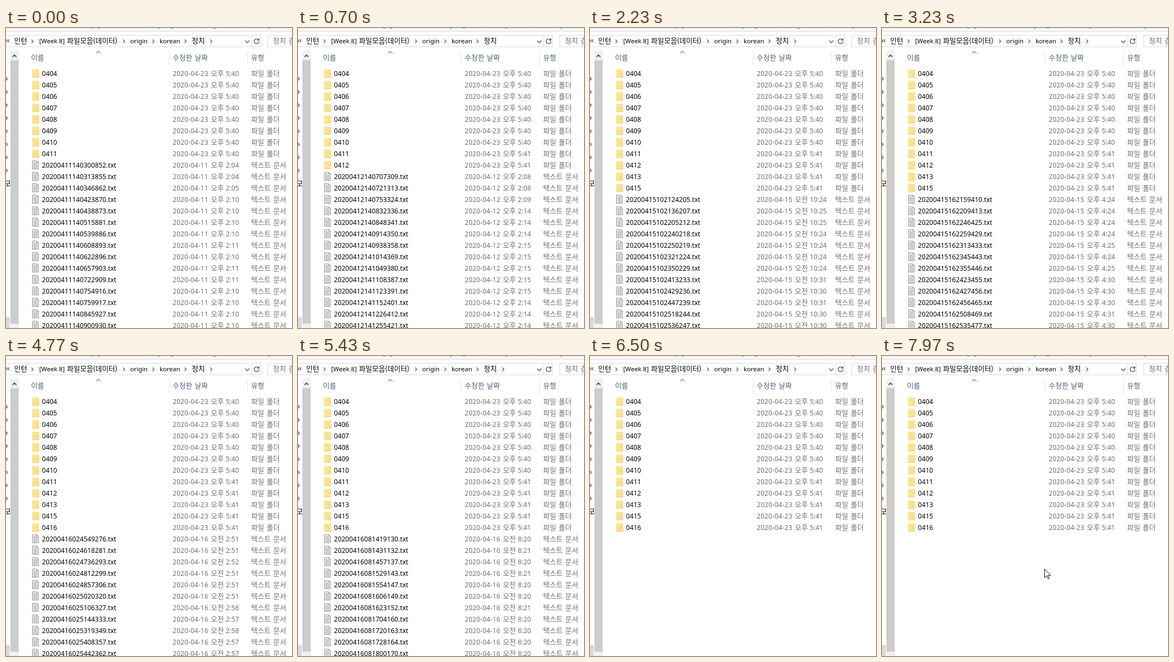
An HTML page for the animation above (8000 ms loop, 525 by 550 pixels).

```html
<!DOCTYPE html>
<html lang="ko">
<head>
<meta charset="utf-8">
<title>Folder list</title>
<style>
html, body { margin: 0; width: 100%; height: 100%; overflow: hidden; background: #fff; }
svg { display: block; width: 525px; height: 550px; }
text { white-space: pre; }
rect { shape-rendering: crispEdges; }
.num { font: 12.15px "Noto Sans", "Open Sans", sans-serif; }
.date { letter-spacing: .2px; }
.path { font: 11.5px "Noto Sans", "Open Sans", sans-serif; }
.kor { font: 13px "Noto Sans CJK KR", "Noto Sans CJK", sans-serif; word-spacing: 1px; }
</style>
</head>
<body>
<svg id="stage" viewBox="0 0 525 550" xmlns="http://www.w3.org/2000/svg">
  <defs>
    <g id="folder">
      <rect x="48" y="-7" width="12" height="15" fill="#f0cd62"/>
      <rect x="48" y="-7" width="11" height="14" fill="#ffe38a"/>
      <rect x="57" y="1" width="4" height="7" fill="#f0cd62"/>
      <rect x="58" y="2" width="2" height="5" fill="#fff0bd"/>
    </g>
    <g id="doc">
      <path d="M48.5 -7.5h8l3 3v12h-11z" fill="#fff" stroke="#8c8c8c"/>
      <path d="M56.5 -7.5v3h3" fill="none" stroke="#8c8c8c"/>
      <path d="M50 -4.5h5M50 -2.5h8M50 -.5h8M50 1.5h8M50 3.5h8M50 5.5h8" stroke="#9a9a9a" fill="none"/>
    </g>
  </defs>
</svg>
<script>
const LOOP = 8000, ROW = 21, TOP = 83, ROWS = 23;
const BLACK = '#000', GRAY = '#6d6d6d', HEAD = '#4c607a', EDGE = '#d9d9d9';
const stage = document.getElementById('stage');

function add(parent, tag, attrs, content) {
  const el = document.createElementNS('http://www.w3.org/2000/svg', tag);
  for (const key in attrs) el.setAttribute(key, attrs[key]);
  if (content) el.textContent = content;
  parent.appendChild(el);
  return el;
}
const rect = (x, y, width, height, fill) => add(stage, 'rect', { x, y, width, height, fill });
const line = (d, stroke, w) => add(stage, 'path', { d, stroke, 'stroke-width': w, fill: 'none' });
const text = (parent, x, y, s, cls, fill) => add(parent, 'text', { x, y, class: cls, fill }, s);
const crumb = x => line(`M${x + .8} 21.2l3.2 3.2l-3.2 3.2`, '#555', 1.3);

function drawRibbon() {
  rect(0, 0, 525, 6, '#f5f6f7');
  rect(0, 6, 525, 1, '#dadbdc');
  for (const x of [66, 263, 346, 431]) rect(x, 0, 1, 4, '#e2e3e4');
  for (const x of [156, 278]) rect(x, 0, 4, 1, '#4d9be0');
  for (const x of [168, 302, 380, 480]) rect(x, 0, 5, 1, '#8a8a8a');
}

function drawAddressBar() {
  for (const y of [13, 34]) {
    rect(0, y, 468, 1, EDGE);
    rect(480, y, 45, 1, EDGE);
  }
  for (const x of [467, 480]) rect(x, 13, 1, 22, EDGE);
  rect(450, 14, 1, 20, '#e3e3e3');
  line('M2.5 21l-2.5 2.5l2.5 2.5M6 21l-2.5 2.5l2.5 2.5', '#444', 1.1);
  text(stage, 15, 28, '인턴', 'kor', BLACK);
  text(stage, 61, 28, '[Week 8]', 'path', BLACK);
  text(stage, 112, 28, '파일모음(데이터)', 'kor', BLACK);
  text(stage, 228, 28, 'origin', 'path', BLACK);
  text(stage, 282, 28, 'korean', 'path', BLACK);
  text(stage, 341, 28, '정치', 'kor', BLACK);
  [46, 214, 268, 327].forEach(crumb);
  line('M439 23l4 4l4-4', '#666', 1.6);
  line('M463.2 21.2a4.5 4.5 0 1 0 1.3 3.3', '#555', 1.4);
  add(stage, 'path', { d: 'M465 18.5v4.5h-4.5z', fill: '#555' });
  text(stage, 490, 28, '정치 검색', 'kor', GRAY);
}

function drawHeader() {
  for (const x of [299, 443]) rect(x, 42, 1, 25, '#e5e5e5');
  line('M165.5 46.5l4-4l4 4', '#777', 1.1);
  text(stage, 46, 59, '이름', 'kor', HEAD);
  text(stage, 306, 59, '수정한 날짜', 'kor', HEAD);
  text(stage, 450, 59, '유형', 'kor', HEAD);
}

function drawSidePane() {
  for (let i = 0; i < 8; i++)
    add(stage, 'path', { d: `M0 ${89 + 24 * i}l4.5 4.5l-1.5 .5l-1.5 3l-1.5-1z`, fill: '#8f979e' });
  text(stage, -3, 290, '모', 'kor', BLACK);
  rect(0, 530, 7, 20, EDGE);
  rect(8, 41, 16, 509, '#f0f0f0');
  rect(8, 59, 15, 483, '#cdcdcd');
  line('M12 53l3.5-3.5l3.5 3.5', '#505050', 1.8);
}

function drawRow(parent, i, icon, name, date, noon, time, type) {
  const y = TOP + ROW * i, base = y + 5;
  add(parent, 'use', { href: '#' + icon, y });
  text(parent, 66, base, name, 'num', BLACK);
  text(parent, 306, base, date, 'num date', GRAY);
  text(parent, 376, base, noon, 'kor', GRAY);
  text(parent, 403.5, base, time, 'num', GRAY);
  text(parent, 450, base, type, 'kor', GRAY);
}

const pad = (n, size = 2) => String(n).padStart(size, '0');
const folderName = i => '0' + (404 + i + (i > 9));   // no folder for the 14th

function seeded(seed) {
  return () => (seed = (seed * 16807) % 2147483647) / 2147483647;
}

// Each listing: start, folder count, first and last file as "time serial",
// and the minute at which six-minute batches are saved.
const listings = [
  { at: 0,    folders: 8,  first: '14:03:00 852', last: '14:09:00 930', save: 4 },
  { at: 700,  folders: 9,  first: '14:07:07 309', last: '14:12:55 421', save: 2 },
  { at: 1170, folders: 9,  first: '17:13:08 512', last: '17:19:40 590', save: 0 },
  { at: 1700, folders: 10, first: '01:04:24 717', last: '03:10:34 289', save: 2 },
  { at: 2230, folders: 11, first: '10:21:24 205', last: '10:25:36 247', save: 0 },
  { at: 2700, folders: 11, first: '14:32:10 316', last: '14:36:50 372', save: 2 },
  { at: 3230, folders: 11, first: '16:21:59 410', last: '16:25:35 477', save: 0 },
  { at: 4500, folders: 12, first: '02:45:49 276', last: '02:54:42 362', save: 3 },
  { at: 5430, folders: 12, first: '08:14:19 130', last: '08:18:00 170', save: 2 },
  { at: 6100, folders: 12, first: '12:57:03 379', last: '13:09:02 565', save: 0 },
  { at: 6500, folders: 12 }
];

function parse(stamp) {
  const [h, m, s, serial] = stamp.split(/[: ]/).map(Number);
  return { sec: h * 3600 + m * 60 + s, serial };
}

function makeFiles({ at, folders, first, last, save }) {
  if (!first) return [];
  const a = parse(first), b = parse(last), random = seeded(at + 7);
  const count = ROWS - folders;
  const serials = (b.serial - a.serial + 1000) % 1000;
  return Array.from({ length: count }, (_, i) => {
    const inner = i > 0 && i < count - 1;
    const p = (i + (inner ? random() - .5 : 0)) / (count - 1);
    const sec = Math.round(a.sec + (b.sec - a.sec) * p);
    const serial = Math.round(a.serial + serials * p) % 1000;
    const min = Math.floor(sec / 60);
    const late = inner && random() < .5 ? 1 : 0;
    const saved = min + 1 + (save - min % 6 + 5) % 6 + late;
    return {
      stamp: pad(Math.floor(min / 60)) + pad(min % 60) + pad(sec % 60) + pad(serial, 3),
      hour: Math.floor(saved / 60),
      minute: pad(saved % 60)
    };
  });
}

function drawListing(listing) {
  const { at, folders } = listing, g = add(stage, 'g', {});
  for (let i = 0; i < folders; i++) {
    const time = i < 7 || at === 0 ? '5:40' : '5:41';
    drawRow(g, i, 'folder', folderName(i), '2020-04-23', '오후', time, '파일 폴더');
  }
  const day = folderName(folders - 1);
  makeFiles(listing).forEach(({ stamp, hour, minute }, i) =>
    drawRow(g, folders + i, 'doc', `2020${day}${stamp}.txt`,
      `2020-${day.slice(0, 2)}-${day.slice(2)}`, hour < 12 ? '오전' : '오후',
      `${hour % 12 || 12}:${minute}`, '텍스트 문서'));
  return g;
}

drawRibbon();
drawAddressBar();
drawHeader();
drawSidePane();
const groups = listings.map(drawListing);
const lastCrumb = crumb(374);
const cursor = add(stage, 'path', {
  d: 'M.5 .5v16l3.7-3.6l2.5 5.8l2.3-1l-2.5-5.6h5.2z', fill: '#fff', stroke: '#000'
});

const show = (el, on) => { el.style.display = on ? '' : 'none'; };
const between = (t, a, b) => t >= a && t < b;

function render(t) {
  const now = listings.filter(l => l.at <= t).length - 1;
  groups.forEach((g, i) => show(g, i === now));
  show(lastCrumb, !between(t, 500, 970) && !between(t, 4430, 4770));

  // The pointer slides in from below in three 70 ms steps, slowing down.
  const step = Math.floor((t - 7830) / 70);
  show(cursor, step >= 0);
  const rest = (1 - step / 2) ** 2;
  cursor.setAttribute('transform', `translate(${298 + 54 * rest} ${390 + 145 * rest})`);
}

const origin = performance.now();
function tick() {
  render((performance.now() - origin) % LOOP);
  requestAnimationFrame(tick);
}
tick();
</script>
</body>
</html>
```
